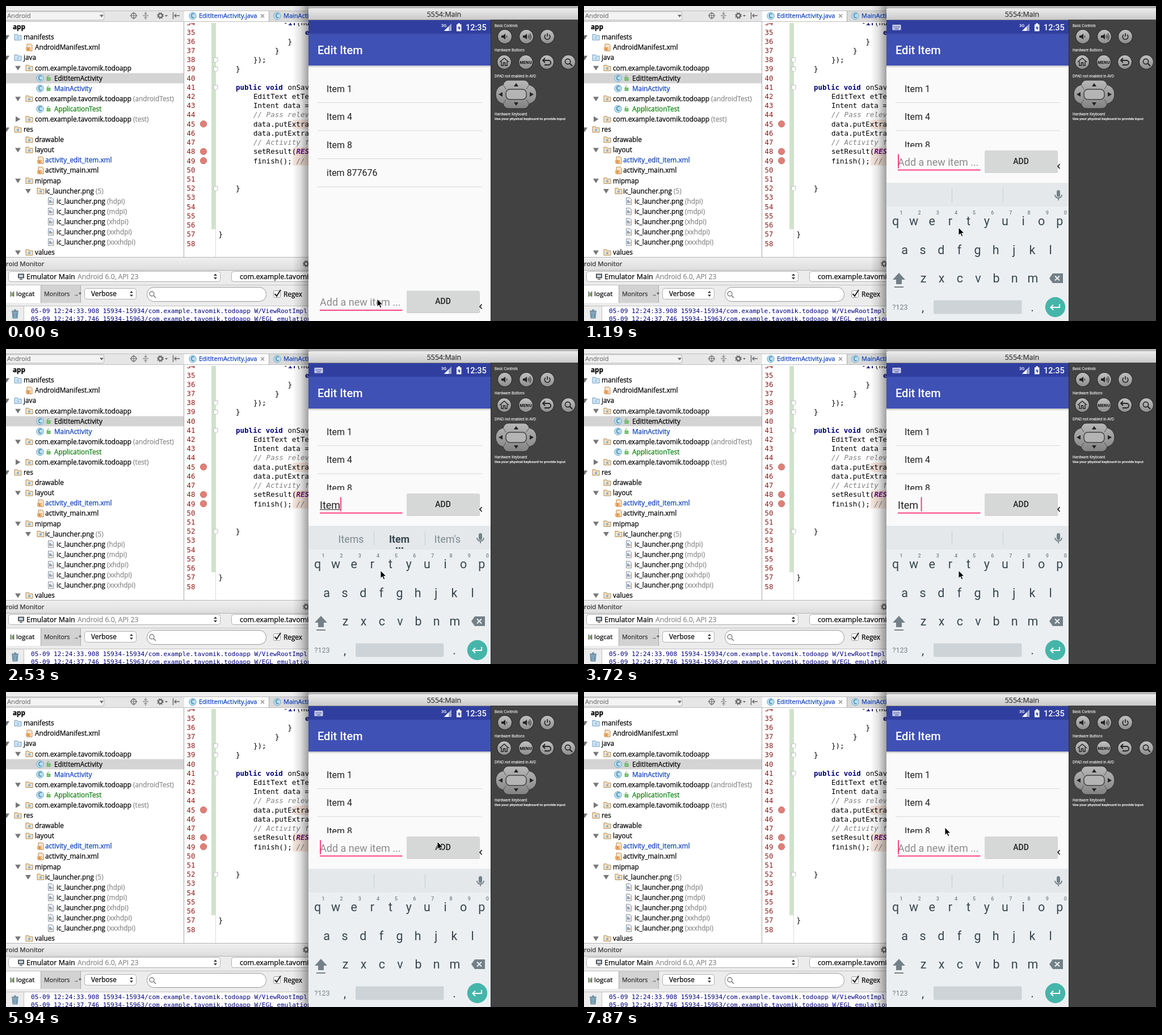
An HTML page that plays this animation: 1008 px wide and 556 px high, repeating every 8000 ms.

```html
<!DOCTYPE html>
<html lang="en">
<head>
<meta charset="utf-8">
<title>Adding a todo item</title>
<style>
  html, body { margin: 0; width: 100%; height: 100%; overflow: hidden; background: #fff; }
  svg { display: block; width: 1008px; height: 556px; }
  text { white-space: pre; font-family: "Open Sans", "Noto Sans", sans-serif; stroke-width: .25px; }
  .code { font-family: "DejaVu Sans Mono", monospace; stroke: none; }
  .droid { font-family: Roboto, sans-serif; stroke: none; }
  .mid { text-anchor: middle; }
  .bold { font-weight: 700; }
  .medium { font-weight: 500; }
  .italic { font-style: italic; }
</style>
</head>
<body>
<svg id="stage" viewBox="0 0 1008 556" xmlns="http://www.w3.org/2000/svg"></svg>
<script>
const LOOP = 8000;
const PACKAGE = 'com.example.tavomik.todoapp';
const BLUE = '#0a3fbf', NAVY = '#000080', GREY = '#8a8a8a';

// Markup helpers
const esc = s => s.replace(/&/g, '&amp;').replace(/</g, '&lt;');
const text = (x, y, s, size, fill = '#000', cls = '', attrs = '') =>
  `<text x="${x}" y="${y}" font-size="${size}" fill="${fill}" stroke="${fill}" class="${cls}" ${attrs}>${esc(s)}</text>`;
const rect = (x, y, w, h, fill, attrs = '') =>
  `<rect x="${x}" y="${y}" width="${w}" height="${h}" fill="${fill}" ${attrs}/>`;
const circle = (x, y, r, fill, attrs = '') => `<circle cx="${x}" cy="${y}" r="${r}" fill="${fill}" ${attrs}/>`;
const path = (d, fill = 'none', attrs = '') => `<path d="${d}" fill="${fill}" ${attrs}/>`;
const line = (d, color, width = 1, attrs = '') => path(d, 'none', `stroke="${color}" stroke-width="${width}" ${attrs}`);
const at = (x, y, body) => `<g transform="translate(${x} ${y})">${body}</g>`;
const gradient = (id, stops, horizontal) =>
  `<linearGradient id="${id}" x2="${horizontal ? 1 : 0}" y2="${horizontal ? 0 : 1}">` +
  stops.map(([o, c, a = 1]) => `<stop offset="${o}" stop-color="${c}" stop-opacity="${a}"/>`).join('') + '</linearGradient>';

const defs = '<defs>' +
  gradient('title', [[0, '#ececec'], [1, '#cacaca']]) +
  gradient('bar', [[0, '#f0f0f0'], [1, '#dedede']]) +
  gradient('key', [[0, '#c2c2c2'], [1, '#8c8c8c']]) +
  gradient('pad', [[0, '#b8b8b8'], [1, '#828282']]) +
  gradient('below', [[0, '#000', .24], [1, '#000', 0]]) +
  gradient('side', [[0, '#000', 0], [.5, '#000', .12], [1, '#000', .37]], true) +
  '<clipPath id="ide"><path d="M0 0H533V556H0Z"/></clipPath>' +
  '<clipPath id="editor"><path d="M314 30H533V443H314Z"/></clipPath>' +
  '<clipPath id="phone"><path d="M533 25H854V556H533Z"/></clipPath>' +
  '<clipPath id="listClip"><rect id="listBox" x="533" y="105" width="321" height="392"/></clipPath></defs>';

// Small icons, centred on their origin
const folder = (fill, edge, badge) =>
  path('M-6 -5H-1L0 -3H6V5H-6Z', fill, `stroke="${edge}"`) + rect(-2, -1, 4, 4, badge);
const icon = {
  folder: folder('#f3e3c6', '#b08a52', '#8db4d8'),
  source: folder('#d3e6f5', '#6d9cc0', '#a9cbe6'),
  xml: path('M-4 -6H3L5 -4V6H-4Z', '#f6e5cf', 'stroke="#c08a4a"') + rect(-6, 0, 8, 5, '#e58f3a') +
    line('M-4 1L-5 2.5L-4 4M0 1L1 2.5L0 4', '#fff'),
  png: path('M-4.500 -6H2L4.500 -3.500V6H-4.500Z', '#eef1f5', 'stroke="#8a929c"') +
    rect(-2.5, -2, 2, 5, '#3f79c2') + rect(0.5, 0, 2, 3, '#c8803c'),
  class: circle(0, 0, 6.3, '#b9dff0', 'stroke="#6fa9c8"') + text(0, 3.7, 'C', 10, '#2a6a92', 'mid'),
  lock: rect(-3, -1, 6, 5, '#7fc678', 'stroke="#4b9b45" stroke-width=".7"') + line('M-2 -1V-3A2 2 0 0 1 1.500 -3.500', '#4b9b45'),
  gear: circle(0, 0, 3.3, 'none', 'stroke="#666" stroke-width="2.2"') + circle(0, 0, 5, 'none', 'stroke="#666" stroke-width="1.8" stroke-dasharray="2 1.930"'),
  steppers: path('M-3 -1.500L0 -5L3 -1.500ZM-3 1.500L0 5L3 1.500Z', '#333'),
};

function projectTree() {
  const pkg = (arrow, note) => [51, 'folder', PACKAGE, arrow, '#000', note];
  const rows = [
    [12, '', 'app'], [31, 'source', 'manifests', 'v'], [51, 'xml', 'AndroidManifest.xml'],
    [31, 'source', 'java', 'v'], pkg('v'), [85, 'class', 'EditItemActivity'],
    [85, 'class', 'MainActivity', '', BLUE], pkg('v', '(androidTest)'),
    [85, 'class', 'ApplicationTest', '', '#0a7a0a'], pkg('>', '(test)'),
    [31, 'folder', 'res', 'v'], [51, 'folder', 'drawable'], [51, 'folder', 'layout', 'v'],
    [69, 'xml', 'activity_edit_item.xml', '', BLUE], [69, 'xml', 'activity_main.xml'],
    [51, 'folder', 'mipmap', 'v'], [69, 'folder', 'ic_launcher.png', 'v', '#000', '(5)'],
    ...['hdpi', 'mdpi', 'xhdpi', 'xxhdpi', 'xxxhdpi'].map(d => [89, 'png', 'ic_launcher.png', '', '#000', `(${d})`]),
    [51, 'folder', 'values', 'v'],
  ];
  let out = rect(0, 28, 313, 415, '#fff') + rect(0, 118.5, 313, 18, '#d4d4d4');
  rows.forEach(([x, kind, label, arrow, color = '#000', note = ''], i) => {
    const y = 37 + i * 18.09, isClass = kind === 'class';
    if (kind) out += at(x - (isClass ? 25 : x === 69 ? 8 : 10), y, icon[kind]);
    if (isClass) out += at(x - 10, y, icon.lock);
    if (arrow) out += at(x - 30, y, path(arrow === 'v' ? 'M-5 -3.500H5L0 4.500Z' : 'M-4 -5V5L4.500 0Z', '#777'));
    out += `<text x="${x}" y="${y + 4.2}" font-size="11.750" fill="${color}" stroke="${color}" class="${i ? '' : 'bold'}">${label}` +
      (note && `<tspan fill="${GREY}" stroke="${GREY}"> ${note}</tspan>`) + '</text>';
  });
  return out + line('M313.500 0V443', '#a8a8a8');
}

function topBars() {
  return rect(0, 0, 533, 28, '#e6e6e6') + rect(0, 0, 533, 8, '#ededed') + line('M0 8.500H533M0 27.500H533', '#bdbdbd') +
    rect(-6, 10, 179, 15, '#f3f3f3', 'rx="4" stroke="#b5b5b5"') + text(2, 21, 'Android', 11.2, '#777') +
    path('M165 15.500H172L168.500 20Z', '#666') +
    circle(225, 17, 4.5, 'none', 'stroke="#666" stroke-width="1.300"') + line('M225 10.500V23.500M218.500 17H231.500', '#666') +
    line('M241 17H251M246 10V15M246 24V19M243.500 13L246 15L248.500 13M243.500 21L246 19L248.500 21', '#666') +
    at(272, 17, icon.gear) + path('M280 16H285L282.500 19Z', '#666') + line('M294.500 11V23M306 17H297M300 14L297 17L300 20', '#666', 1.4) +
    rect(314, 9, 149, 18, '#fff') + rect(463, 9, 70, 18, '#dadada') + line('M463.500 9V28', '#aaa') +
    at(329, 17.5, icon.class) + text(340, 21.3, 'EditItemActivity.java', 11, BLUE) +
    line('M449 14.500L455 20.500M455 14.500L449 20.500', '#888', 1.2) +
    at(478, 17.5, icon.class) + text(489, 21.3, 'MainActivity.java', 11, BLUE);
}

function codeEditor() {
  const base = n => 50.5 + (n - 35) * 16.22;
  const code = (n, x, s, fill = '#000', cls = '') => text(x, base(n), s, 12.52, fill, 'code ' + cls);
  let out = rect(314, 28, 219, 415, '#fff') + rect(362, 28, 8, 366, '#cfe3ca') + line('M369.500 28V443', '#dcdcdc');
  for (let n = 34; n <= 58; n++) out += text(318.5, base(n), String(n), 12.3, '#8c1c1c', 'code');
  for (const n of [45, 48, 49])
    out += rect(505, base(n) - 12, 28, 16, '#f8e6dc') + circle(348, base(n) - 4.5, 5.6, '#df8078', 'stroke="#c97068"');
  for (const n of [38, 39, 41, 52])
    out += at(369.5, base(n) - 4, path('M-3.500 -4H3.500V2L0 5L-3.500 2Z', '#fff', 'stroke="#bbb"'));
  out += code(34, 489, '-') + code(34, 497, 'if', NAVY, 'bold') + code(34, 512, '(nu') + code(35, 527, 'e', NAVY, 'bold') +
    code(36, 496.5, '}') + code(37, 474, '}') + code(38, 436, '});') + code(39, 405, '}') +
    code(41, 405, 'public void', NAVY, 'bold') + code(41, 496.5, 'onSave') +
    code(42, 436, 'EditText etTe') + code(43, 436, 'Intent data =') +
    code(44, 436, '// Pass relev', '#808080', 'italic') +
    code(45, 436, 'data.putExtra') + code(46, 436, 'data.putExtra') +
    code(47, 436, '// Activity f', '#808080', 'italic') +
    code(48, 436, 'setResult(') + code(48, 511.4, 'RES', '#660e7a', 'bold italic') +
    code(49, 436, 'finish();') + code(49, 511.4, '//', '#808080', 'italic') + code(52, 405, '}') + code(57, 374.5, '}');
  return `<g clip-path="url(#editor)">${out}</g>`;
}

function monitorPanel() {
  const box = (x, y, w, h) => rect(x, y, w, h, '#fff', 'rx="4" stroke="#b0b0b0"');
  const log = (y, time, thread, tail) =>
    text(44, y, `05-09 12:24:${time} 15934-${thread}/${PACKAGE} ${tail}`, 11.08, NAVY, 'code');
  return rect(0, 443, 533, 113, '#ececec') + rect(0, 443, 533, 23, 'url(#bar)') + line('M0 443.500H533M0 466.500H533', '#b4b4b4') +
    text(0, 459, 'roid Monitor', 11.5, '#333') + at(529, 455, icon.gear) +
    box(4.5, 468.5, 373, 18) + at(26, 477.5, rect(-5, -5, 11, 8, '#555') + rect(-3, -3, 7, 4, '#cde') + rect(-2, 4, 5, 1.5, '#555')) +
    text(36, 481.7, 'Emulator Main', 12.5) + text(126, 481.7, 'Android 6.0, API 23', 12.2, GREY) + at(369, 477.5, icon.steppers) +
    box(397.5, 468.5, 150, 18) + text(412, 481.7, PACKAGE, 12.5) + line('M0 492.500H533', '#c0c0c0') +
    rect(0, 493, 61, 31, '#fff') + rect(61, 493, 70, 31, '#d2d2d2') + line('M61.500 493V524M131.500 493V524', '#aaa') +
    line('M8.500 504V513M13.500 504V513', '#555', 1.5) + rect(10, 506, 3, 6, '#7da95b') + text(18, 512.3, 'logcat', 11.6) +
    text(67, 512.3, 'Monitors', 10.8, '#333') + text(119, 512, '→*', 9, '#555') +
    box(138.5, 498.5, 91, 19) + text(150, 512, 'Verbose', 11.8) + at(221, 508, icon.steppers) +
    rect(248.5, 496.5, 210, 25, '#fff', 'rx="12" stroke="#999"') + circle(257, 508, 4, 'none', 'stroke="#777" stroke-width="1.300"') +
    line('M260 511L264 515', '#777', 1.6) +
    rect(471.5, 502.5, 12, 12, '#fff', 'rx="2" stroke="#999"') + line('M473.500 508L477 512L484 501', '#222', 2) +
    text(489, 513, 'Regex', 11.8) +
    rect(32, 530, 501, 26, '#fff') + line('M0 529.500H533M31.500 530V556', '#c0c0c0') +
    at(16, 543, path('M-5 -3H5L4 8H-4Z', '#8eb3c9', 'stroke="#547a92"') + line('M-6 -4.500H6M-2 -6.500H2M-2 -1V6M2 -1V6', '#547a92', 1.3)) +
    log(541.8, '33.908', '15934', 'W/ViewRootImpl') + log(555.8, '37.746', '15963', 'W/EGL_emulation');
}

function controls() {
  const small = (y, s, size = 6.2, cls = '') => text(861, y, s, size, '#dedede', cls);
  const button = (x, y, glyph) => at(x, y, circle(0, 0, 12.5, 'url(#key)', 'stroke="#2e2e2e" stroke-width="1.200"') + glyph);
  const ink = '#222';
  const speaker = path('M-6 -2H-3L1 -5V5L-3 2H-6Z', ink);
  return rect(854, 24, 154, 532, '#424242') + line('M854.500 24V556', '#2c2c2c') +
    small(36.5, 'Basic Controls') + small(79.5, 'Hardware Buttons') + small(125.5, 'DPAD not enabled in AVD') +
    small(192.5, 'Hardware Keyboard') + small(200.5, 'Use your physical keyboard to provide input', 5.7, 'bold') +
    button(879, 54, speaker + line('M3 -2Q4.500 0 3 2', ink)) +
    button(917, 54, speaker + line('M3 -2Q4.500 0 3 2M4.500 -4Q7.500 0 4.500 4M6 -6Q10.500 0 6 6', ink)) +
    button(954, 54, line('M-3 -3.500A4.800 4.800 0 1 0 3 -3.500M0 -6V0', ink, 1.6)) +
    button(878, 99, line('M-8 0L0 -7L8 0M-5 -1V6H-1.500V1H1.500V6H5V-1', ink, 1.4)) +
    button(916, 99, text(0, 2.7, 'MENU', 7, ink, 'mid bold')) +
    button(953, 99, line('M-3 -7L-7 -3L-3 1M-7 -3H3A4 4 0 0 1 3 5H-4', ink, 1.8)) +
    button(991, 99, circle(-1, -1, 4.6, 'none', `stroke="${ink}" stroke-width="1.600"`) + line('M2.500 2.500L7 7', ink, 2)) +
    at(899, 156, path('M-14 -25H14Q20 -25 23 -17Q36 -13 36 0Q36 13 23 17Q20 25 14 25H-14Q-20 25 -23 17Q-36 13 -36 0Q-36 -13 -23 -17Q-20 -25 -14 -25Z', 'url(#pad)', 'stroke="#2d2d2d"') +
      line('M-23 -17L-18 -9M23 -17L18 -9M-23 17L-18 9M23 17L18 9', '#555') +
      rect(-18, -9, 36, 18, '#b4b4b4', 'rx="7" stroke="#444" stroke-width="1.500"') +
      path('M-4 -14H4L0 -20ZM-4 14H4L0 20ZM-24 -4V4L-31 0ZM24 -4V4L31 0Z', '#222'));
}

function keyboard() {
  const ink = '#37474f', soft = '#738087';
  const row = (letters, x, y) => [...letters].map((c, i) => text(x + i * 32.15, y, c, 21.5, ink, 'droid mid')).join('');
  const hints = [...'1234567890'].map((c, i) => text(559 + i * 32.15, 368, c, 9, soft, 'droid mid medium')).join('');
  return rect(533, 312, 321, 244, '#eceff1') + rect(533, 312, 321, 42, '#e4e8ea') + line('M648.500 322V346M738.500 322V346', '#c5cdd1') +
    at(836, 334, rect(-3, -9, 6, 12, soft, 'rx="3"') + line('M-6 -1A6 6 0 0 0 6 -1M0 5V9', soft, 1.8)) +
    hints + row('qwertyuiop', 549, 386.5) + row('asdfghjkl', 565, 437.5) + row('zxcvbnm', 598, 488) +
    at(555, 482, path('M0 -11L11 1H5V9H-5V1H-11Z', soft) + rect(-8, 13, 16, 2, soft)) +
    at(832, 480.5, path('M-12 0L-6 -8.500H12V8.500H-6Z', soft) + line('M-2 -4L6 4M6 -4L-2 4', '#eceff1', 2)) +
    text(557, 536, '?123', 12.5, soft, 'droid mid') + text(597, 539, ',', 21.5, ink, 'droid mid') +
    rect(616, 519.5, 155.5, 24, '#cdd3d6', 'rx="2"') + text(790, 539, '.', 21.5, ink, 'droid mid') +
    circle(830.5, 531.5, 17.7, '#45b5aa') + line('M838 526V532H823M827 527.500L822.500 532L827 536.500', '#fff', 2) +
    [608, 693, 778].map((x, i) => text(x, 341.5, '', 17.8, i === 1 ? ink : '#7b898f', 'droid mid' + (i === 1 ? ' bold' : ''), `id="word${i}"`)).join('') +
    `<g id="more">${[-5, 0, 5].map(d => rect(692 + d, 350, 3, 2.5, ink)).join('')}</g>`;
}

function phone() {
  const items = ['Item 1', 'Item 4', 'Item 8', 'item 877676'].map((s, i) =>
    text(565, 151.5 + i * 49.55, s, 16, '#212121', 'droid') + rect(549, 170 + i * 49.55, 289.5, 1, '#d8d8d8')).join('');
  const entry = text(553, 529, '', 18, '#212121', 'droid', 'id="field"') +
    rect(553, 536, 145.5, 2, '#ff4081') + rect(553, 530.5, 0, 1, '#212121', 'id="composing"') + rect(553, 509, 2, 25, '#ff4081', 'id="caret"') +
    rect(706, 504, 129, 38, '#000', 'rx="2" opacity=".18"') + rect(706, 502.5, 128.5, 38, '#d6d7d7', 'rx="2" id="button"') +
    text(770, 526, 'ADD', 14, '#212121', 'droid mid medium') + line('M838.500 526.500L835 530.500L838.500 534.500', '#111', 1.6);
  return '<g clip-path="url(#phone)">' + rect(533, 25, 321, 531, '#fafafa') +
    `<g clip-path="url(#listClip)">${items}</g>` +
    rect(533, 105, 321, 4, 'url(#below)') + rect(533, 25, 321, 24.5, '#303f9f') + rect(533, 49, 321, 56, '#3f51b5') +
    text(549, 84.6, 'Edit Item', 20, '#fff', 'droid medium') + text(810, 42.5, '12:35', 14.5, '#fff', 'droid medium') +
    text(767, 36.5, '3G', 7.5, '#fff', 'droid medium') + path('M785 31V44H772Z', '#9fa6d3') + path('M780 36V44H772Z', '#fff') +
    path('M794 32.500H796.500V30.500H800V32.500H802.500V44.500H794Z', '#fff') + path('M799 34.500L796 39.500H798V43L801 38H799Z', '#303f9f') +
    `<g id="imeIcon">${rect(543.5, 33, 15, 9.5, '#cfd3ec', 'rx="1"')}${line('M545.500 35.800H557M545.500 38.200H557', '#303f9f', 1.2, 'stroke-dasharray="1.300 1"')}${line('M547.500 40.600H554.500', '#303f9f')}</g>` +
    `<g id="entry">${entry}</g><g id="keyboard">${keyboard()}</g></g>`;
}

const pointer = `<g id="pointer">${path('M0 0V13.800L3.200 10.800L5.400 15.800L7.800 14.800L5.600 10H10Z', '#000', 'stroke="#fff" stroke-width="1" stroke-linejoin="round"')}</g>`;

document.getElementById('stage').innerHTML = defs +
  `<g clip-path="url(#ide)">${projectTree() + topBars() + codeEditor() + monitorPanel()}</g>` +
  rect(505, 0, 28, 556, 'url(#side)') + rect(533, 0, 475, 5, '#b4b4b4') +
  path('M533 24V9Q533 4 538 4H1008V24Z', 'url(#title)') + line('M533 24.500H1008', '#8a8a8a') +
  text(772, 18.6, '5554:Main', 12.4, '#333', 'mid') + phone() + controls() + pointer;

// Stepped tracks: each value holds until the next time
const typed = [[0, ''], [1640, 'I'], [1790, 'It'], [2080, 'Ite'], [2380, 'Item'], [2680, 'Item '], [3860, 'Item 9'], [5650, '']];
const words = [[0, ''], [1790, "Is It It's"], [2230, 'Item Ite Items'], [2530, "Items Item Item's"], [2820, '']];
const caretOn = [[0, 0], [450, 1], [750, 0], [1190, 1], [3120, 0], [3720, 1], [4310, 0], [4900, 1], [5350, 0], [5650, 1],
  [6090, 0], [6690, 1], [7130, 0], [7720, 1]];
const keyboardDrop = [[0, 244], [150, 170], [300, 40], [450, 0]];
const pointerAt = [[0, [654, 517]], [750, [657, 450]], [900, [660, 391]],
  [4460, [672, 360]], [4610, [705, 290]], [4750, [740, 235]], [4900, [760, 222]], [5050, [760, 264]],
  [6240, [770, 300]], [6390, [764, 312]], [6540, [754, 285]], [6690, [748, 268]], [6840, [750, 290]],
  [6990, [757, 335]], [7130, [742, 374]], [7280, [706, 352]], [7430, [668, 305]], [7580, [646, 262]], [7720, [638, 244]], [7870, [636, 239]]];
const hold = (track, t) => track.findLast(([start]) => start <= t)[1];

const el = id => document.getElementById(id);
const set = (id, attrs) => { for (const k in attrs) el(id).setAttribute(k, attrs[k]); };
const show = (id, on) => set(id, { visibility: on ? 'visible' : 'hidden' });

function render(t) {
  const value = hold(typed, t), suggestions = hold(words, t), open = t >= 300;
  set('listBox', { height: open ? 144 : 392 });
  set('entry', { transform: `translate(0 ${open ? -247.5 : 0})` });
  set('keyboard', { transform: `translate(0 ${hold(keyboardDrop, t)})` });
  show('keyboard', t >= 150);
  show('imeIcon', open);

  const field = el('field');
  field.textContent = value || 'Add a new item ...';
  set('field', { fill: value ? '#212121' : '#8b8b8b' });
  const width = value ? field.getComputedTextLength() : 0;
  set('caret', { x: 553 + width });
  show('caret', hold(caretOn, t));
  set('composing', { width: suggestions && !value.endsWith(' ') ? width : 0 });

  const list = suggestions.split(' ');
  for (let i = 0; i < 3; i++) el('word' + i).textContent = list[i] || '';
  set('more', { opacity: suggestions ? 1 : 0 });
  set('button', { fill: t >= 5500 && t < 5650 ? '#c3c4c4' : '#d6d7d7' });
  set('pointer', { transform: `translate(${hold(pointerAt, t)})` });
}

const start = performance.now();
function tick() {
  render((performance.now() - start) % LOOP);
  requestAnimationFrame(tick);
}
tick();
</script>
</body>
</html>
```
